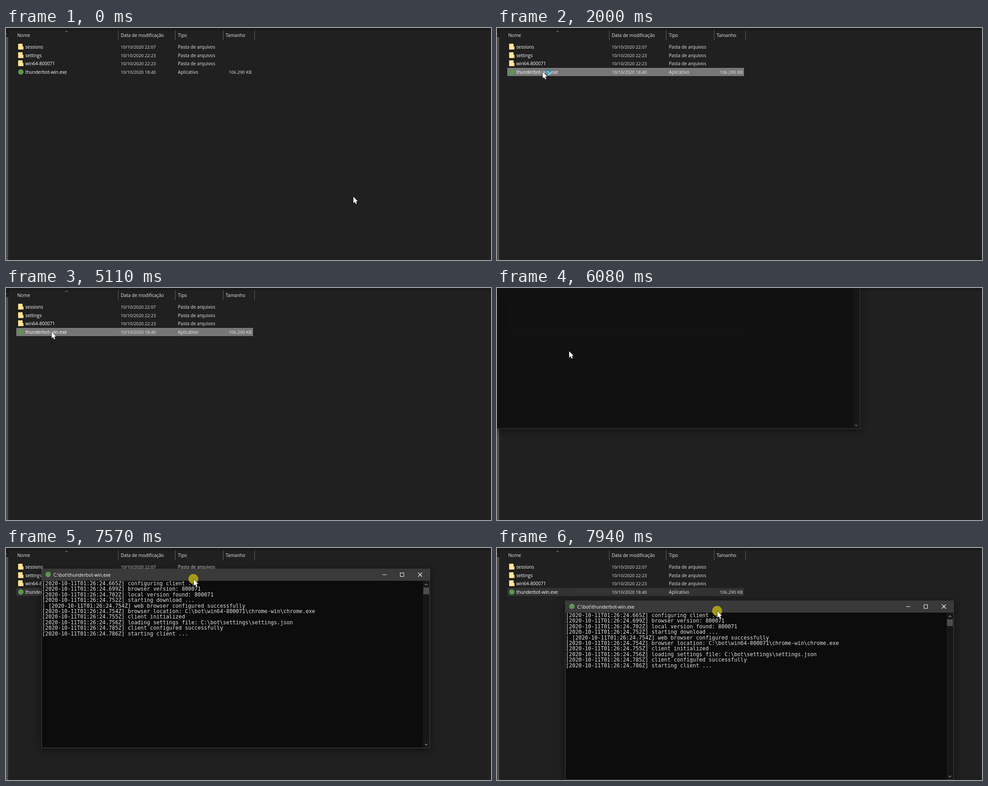
Write an HTML page with a canvas that moves like this. It is 1082 by 517 pixels and loops after 8 s.

```html
<!DOCTYPE html>
<html lang="pt-BR">
<head>
<meta charset="utf-8">
<title>Explorador e console</title>
<style>
html, body { margin: 0; width: 100%; height: 100%; overflow: hidden; background: #202020; }
canvas { display: block; }
</style>
</head>
<body>
<canvas id="stage" width="1082" height="517"></canvas>
<script>
const W = 1082, H = 517, LOOP = 8000;
const ctx = document.getElementById('stage').getContext('2d', { alpha: false });
const UI = '"Open Sans", "Noto Sans", sans-serif';
const MONO = '"DejaVu Sans Mono", monospace';

const files = [
  ['sessions', '22:07'],
  ['settings', '22:23'],
  ['win64-800071', '22:23'],
  ['thunderbot-win.exe', '18:40', '106.290 KB']
];

const log = [
  [665, 'configuring client ...'],
  [699, 'browser version: 800071'],
  [702, 'local version found: 800071'],
  [752, 'starting download ...'],
  [754, 'web browser configured successfully', '| '],
  [754, 'browser location: C:\\bot\\win64-800071\\chrome-win\\chrome.exe'],
  [755, 'client initialized'],
  [756, 'loading settings file: C:\\bot\\settings\\settings.json'],
  [785, 'client configured successfully'],
  [786, 'starting client ...']
];

const OPEN = 5980, DRAG = 7400, DRAG_END = 7940;
const GRIP = { x: 339, y: 23 };

// Pointer moves: start, end, target position
const moves = [
  [10, 800, 179, 104],
  [830, 980, 102, 98],
  [5090, 5570, 161, 141],
  [6330, 6790, 282, -63]
];
const clicks = [[1130, 1270], [1350, 1500]];

const clamp = v => Math.max(0, Math.min(1, v));
const mix = (a, b, p) => a + (b - a) * p;
const span = (t, a, b) => clamp((t - a) / (b - a));
const smooth = p => p < 0.5 ? 2 * p * p : 1 - 2 * (1 - p) ** 2;
const easeOut = p => 1 - (1 - p) ** 2.75;

function rect(x, y, w, h, color) {
  ctx.fillStyle = color;
  ctx.fillRect(x, y, w, h);
}

function text(s, x, y, color, size = 10.1, font = UI, align = 'left') {
  ctx.font = size + 'px ' + font;
  ctx.textAlign = align;
  ctx.fillStyle = color;
  ctx.fillText(s, x, y);
}

function disc(x, y, r, color) {
  ctx.fillStyle = color;
  ctx.beginPath();
  ctx.arc(x, y, r, 0, Math.PI * 2);
  ctx.fill();
}

function line(points, color, width = 1) {
  ctx.strokeStyle = color;
  ctx.lineWidth = width;
  ctx.beginPath();
  points.forEach(([x, y]) => ctx.lineTo(x, y));
  ctx.stroke();
}

function chevron(x, y, dir, color, width = 1) {
  line([[x - 3, y + 1.5 * dir], [x, y - 1.5 * dir], [x + 3, y + 1.5 * dir]], color, width);
}

function folder(x, y) {
  rect(x, y, 10, 13, '#f7d67a');
  rect(x + 1, y + 1, 9, 12, '#ffe698');
  rect(x + 9, y + 6, 3, 7, '#f9d778');
}

function pointerAt(t) {
  let x = 775, y = 376;
  for (const [a, b, tx, ty] of moves) {
    const p = smooth(span(t, a, b));
    x = mix(x, tx, p);
    y = mix(y, ty, p);
  }
  return { x, y };
}

function windowAt(t) {
  const p = easeOut(span(t, DRAG, DRAG_END));
  return { x: Math.round(mix(-57, 152, p)), y: Math.round(mix(-86, 117, p)) };
}

function drawRow(t, mouse) {
  if (t >= OPEN) rect(23, 89, 528, 18, '#333333');
  else if (t >= 1130) {
    rect(23, 89, 528, 18, '#777777');
    ctx.strokeStyle = '#858585';
    ctx.lineWidth = 1;
    ctx.strokeRect(23.5, 89.5, 527, 17);
  } else if (mouse.x < 551 && mouse.y < 108) rect(22, 88, 530, 20, '#4d4d4d');
}

function drawExplorer(t, mouse) {
  rect(0, 0, W, H, '#202020');
  rect(0, 0, W, 5, '#191919');
  rect(0, 5, 8, H, '#191919');
  rect(0, 20, 5, H, '#4d4d4d');
  rect(7, 5, 1, H, '#2b2b2b');
  line([[0, 12], [2.5, 15]], '#777777');

  for (const x of [250, 377, 484, 554]) rect(x, 5, 1, 22, '#636363');
  text('Nome', 25, 20, '#e8e8e8');
  text('Data de modificação', 256, 20, '#e8e8e8');
  text('Tipo', 383.5, 20, '#e8e8e8');
  text('Tamanho', 490, 20, '#e8e8e8');
  chevron(135, 7.5, 1, '#a0a0a0');

  drawRow(t, mouse);
  files.forEach(([name, time, size], i) => {
    const y = 46 + Math.round(i * 18.6);
    if (size) disc(33, y - 4, 6, '#5d9650');
    else folder(27, y - 11);
    text(name, 43, y, '#ffffff');
    text('10/10/2020 ' + time, 256, y, '#e4e4e4', 9.65);
    text(size ? 'Aplicativo' : 'Pasta de arquivos', 383.5, y, '#e4e4e4');
    if (size) text(size, 548, y, '#e4e4e4', 9.8, UI, 'right');
  });
}

function drawConsole(t) {
  const { x, y } = windowAt(t);
  const w = 867, h = 400;
  ctx.save();
  ctx.globalAlpha = span(t, OPEN - 40, OPEN + 120);
  ctx.translate(x, y);
  ctx.shadowColor = 'rgba(0,0,0,0.5)';
  ctx.shadowBlur = 18;
  ctx.shadowOffsetY = 4;
  rect(0, 0, w, h, '#464646');
  ctx.shadowColor = 'transparent';

  rect(1, 0, w - 2, 27, '#3a3a3a');
  rect(1, 27, w - 2, h - 28, '#0c0c0c');
  disc(15, 13, 6, '#5d9650');
  text('C:\\bot\\thunderbot-win.exe', 27, 17.5, '#ffffff', 10.3);

  rect(761, 13, 9, 1, '#ffffff');
  ctx.strokeStyle = '#ffffff';
  ctx.lineWidth = 1;
  ctx.strokeRect(800.5, 9.5, 8, 8);
  line([[840.5, 9], [849.5, 18]], '#ffffff', 1.1);
  line([[849.5, 9], [840.5, 18]], '#ffffff', 1.1);

  rect(851, 27, 15, h - 28, '#171717');
  rect(852, 42, 13, 15, '#4d4d4d');
  chevron(858.5, 35.5, 1, '#858585', 1.3);
  chevron(858.5, 392, -1, '#858585', 1.3);

  log.forEach(([ms, message, prefix = ''], i) => {
    if (t < 6180 + ms - 665) return;
    const entry = `${prefix}[2020-10-11T01:26:24.${ms}Z] ${message}`;
    text(entry, 1.5, Math.round(37 + i * 12.4), '#e0e0e0', 11.77, MONO);
  });
  ctx.restore();
}

function drawPointer(x, y) {
  const shape = [[0, 0], [0, 14], [3.2, 11.2], [5.4, 16.2], [7.8, 15.2], [5.6, 10.3], [9.8, 10.3]];
  ctx.save();
  ctx.translate(Math.round(x), Math.round(y));
  ctx.beginPath();
  shape.forEach(([px, py]) => ctx.lineTo(px, py));
  ctx.closePath();
  ctx.lineWidth = 1.2;
  ctx.strokeStyle = '#101010';
  ctx.stroke();
  ctx.fillStyle = '#ffffff';
  ctx.fill();
  ctx.restore();
}

function drawBusyRing(t) {
  const turn = (t - 2000) / 800 * Math.PI * 2;
  const ring = (a, b, color) => {
    ctx.strokeStyle = color;
    ctx.lineWidth = 2.4;
    ctx.beginPath();
    ctx.arc(114.5, 98.5, 5, a, b);
    ctx.stroke();
  };
  ring(0, Math.PI * 2, '#1c83b8');
  ring(turn, turn + 1.8, '#7fdcff');
}

function draw(t) {
  const dragging = t >= DRAG;
  let mouse = pointerAt(t);
  if (dragging) {
    const win = windowAt(t);
    mouse = { x: win.x + GRIP.x, y: win.y + GRIP.y };
  }
  drawExplorer(t, mouse);
  if (t >= OPEN) drawConsole(t);
  if (dragging || clicks.some(([a, b]) => t >= a && t < b)) {
    disc(mouse.x, mouse.y, 11, 'rgba(190,178,20,0.82)');
  }
  drawPointer(mouse.x + (dragging ? 1 : 0), mouse.y + (dragging ? 1 : 0));
  if (t >= 2000 && t < 3200) drawBusyRing(t);
}

const start = performance.now();
function tick() {
  draw((performance.now() - start) % LOOP);
  requestAnimationFrame(tick);
}
tick();
</script>
</body>
</html>
```
